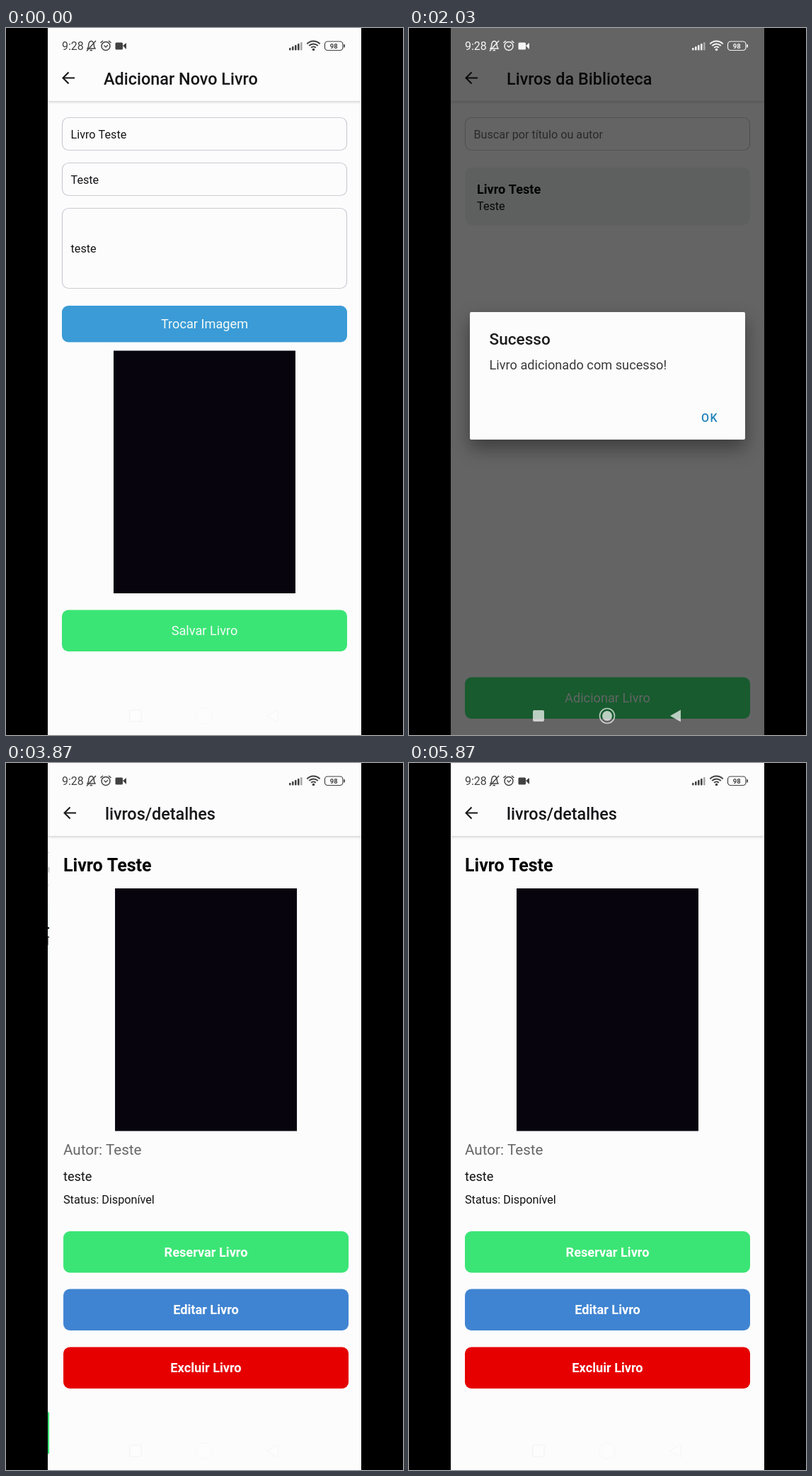
Animation, 561 px wide and 998 px high, one loop 5.9 s. Source, as an HTML page with a canvas:

```html
<!DOCTYPE html>
<html lang="pt">
<head>
<meta charset="utf-8">
<style>
html, body { margin: 0; width: 100%; height: 100%; overflow: hidden; background: #000; }
canvas { display: block; }
</style>
</head>
<body>
<canvas id="stage" width="561" height="998"></canvas>
<script>
const W = 561, H = 998, LOOP = 5900;
const PHONE = { x: 59, w: 443 };
const PAPER = '#fcfcfd', GREEN = '#3be575', BLUE = '#3a9bd6', INK = '#151517';
const stage = document.getElementById('stage').getContext('2d');
const buffers = [];
let c = stage, depth = 0;

const clamp = v => Math.min(1, Math.max(0, v));
const progress = (t, start, length) => clamp((t - start) / length);
const mix = (a, b, p) => a + (b - a) * p;

// Two-part curve used by the system for screen changes
function screenEase(x) {
  const [p0, p1, p2, p3] = x < 1 / 6
    ? [[0, 0], [0.05, 0], [0.1333, 0.06], [0.16667, 0.4]]
    : [[0.16667, 0.4], [0.20833, 0.82], [0.25, 1], [1, 1]];
  const at = (s, k) => (1 - s) ** 3 * p0[k] + 3 * s * (1 - s) ** 2 * p1[k]
    + 3 * s * s * (1 - s) * p2[k] + s ** 3 * p3[k];
  let lo = 0, hi = 1;
  for (let i = 0; i < 24; i++) {
    const mid = (lo + hi) / 2;
    if (at(mid, 0) < x) lo = mid; else hi = mid;
  }
  return at(lo, 1);
}

// Opacity of a touched element: quick fade down, slower return
const touchAlpha = (t, down, up) =>
  mix(mix(1, 0.2, progress(t, down, 150)), 1, progress(t, up, 250));

function layer(alpha, dx, paint) {
  if (alpha <= 0) return;
  const parent = c;
  buffers[depth] = buffers[depth] || new OffscreenCanvas(W, H).getContext('2d');
  c = buffers[depth++];
  c.clearRect(0, 0, W, H);
  paint();
  const image = c.canvas;
  c = parent;
  depth--;
  c.globalAlpha = alpha;
  c.drawImage(image, dx, 0);
  c.globalAlpha = 1;
}

function box(x, y, w, h, r, fill, stroke) {
  c.beginPath();
  c.roundRect(x, y, w, h, r);
  if (fill) { c.fillStyle = fill; c.fill(); }
  if (stroke) { c.strokeStyle = stroke; c.lineWidth = 1.2; c.stroke(); }
}

function text(str, x, y, size, color = INK, weight = 400, align = 'left', spacing = 0) {
  c.font = `${weight} ${size}px Roboto, sans-serif`;
  c.letterSpacing = spacing + 'px';
  c.textAlign = align;
  c.fillStyle = color;
  c.fillText(str, x, y);
}

function line(points, width, color) {
  c.beginPath();
  points.forEach(([x, y]) => c.lineTo(x, y));
  c.strokeStyle = color;
  c.lineWidth = width;
  c.stroke();
}

function button(label, y, h, color, weight = 400) {
  box(79, y, 403, h, 9, color);
  text(label, 280.5, y + h / 2 + 6.5, 18.2, weight > 400 ? '#fff' : '#f4fbf8', weight, 'center');
}

function field(label, y, h, color = INK) {
  box(79.5, y + 0.5, 402, h - 1, 9, null, '#cbcbd2');
  text(label, 91.5, y + h / 2 + 6, 16.2, color);
}

function header(title) {
  c.save();
  c.shadowColor = 'rgba(0,0,0,.22)';
  c.shadowBlur = 4;
  c.shadowOffsetY = 1;
  c.fillStyle = PAPER;
  c.fillRect(PHONE.x, -10, PHONE.w, 113);
  c.restore();
  line([[97, 70.5], [81, 70.5]], 2, INK);
  line([[88.5, 62.5], [80.5, 70.5], [88.5, 78.5]], 2, INK);
  text(title, 138, 80, 23.4, INK, 500);
}

function paper() {
  c.fillStyle = PAPER;
  c.fillRect(PHONE.x, 0, PHONE.w, H);
}

function cover(y) {
  c.fillStyle = '#08040e';
  c.fillRect(152, y, 257, 342.5);
}

function formScreen(saveAlpha) {
  paper();
  header('Adicionar Novo Livro');
  field('Livro Teste', 126, 47);
  field('Teste', 190, 47);
  field('teste', 254, 114);
  button('Trocar Imagem', 392, 51.5, BLUE);
  cover(455.5);
  layer(saveAlpha, 0, () => button('Salvar Livro', 821.5, 58.5, GREEN));
}

function listScreen(itemAlpha) {
  paper();
  header('Livros da Biblioteca');
  field('Buscar por título ou autor', 126, 47, '#666');
  layer(itemAlpha, 0, () => {
    box(79, 197, 403, 81, 9, '#ecf0f2');
    text('Livro Teste', 96, 233.5, 18.1, '#000', 700);
    text('Teste', 96, 256.5, 16.2, '#111');
  });
  button('Adicionar Livro', 916.5, 58.5, GREEN);
}

function detailScreen() {
  paper();
  header('livros/detalhes');
  text('Livro Teste', 79, 152.5, 25, '#000', 700);
  cover(177);
  text('Autor: Teste', 79, 553, 20.6, '#666');
  text('teste', 79, 590, 18.1, '#111');
  text('Status: Disponível', 79, 621.5, 16.2, '#111');
  button('Reservar Livro', 661, 58.5, GREEN, 700);
  button('Editar Livro', 742.5, 58.5, '#3f84d2', 700);
  button('Excluir Livro', 824.5, 58.5, '#e60000', 700);
}

function dialog() {
  c.save();
  c.shadowColor = 'rgba(0,0,0,.4)';
  c.shadowBlur = 26;
  c.shadowOffsetY = 12;
  box(86, 401, 389, 180, 2, PAPER);
  c.restore();
  text('Sucesso', 113.5, 447, 22.6, '#1c1c1c', 500);
  text('Livro adicionado com sucesso!', 113.5, 481.5, 18.2, '#3a3a3a');
  text('OK', 413, 555.5, 16, '#2383b8', 500, 'left', 1.4);
}

function circle(x, y, r, width, color, from = 0, to = Math.PI * 2) {
  c.beginPath();
  c.arc(x, y, r, from, to);
  c.strokeStyle = color;
  c.lineWidth = width;
  c.stroke();
}

function statusBar(white) {
  const shade = Math.round(mix(66, 245, white));
  const ink = `rgb(${shade},${shade},${shade})`;
  text('9:28', 79, 31, 16, ink, 400);

  // Muted bell
  c.beginPath();
  c.moveTo(115, 29);
  c.lineTo(116.5, 26.5);
  c.bezierCurveTo(116.5, 16, 124.5, 16, 124.5, 26);
  c.lineTo(126, 29);
  c.closePath();
  c.strokeStyle = ink;
  c.lineWidth = 1.4;
  c.stroke();
  line([[118.5, 31.5], [122, 31.5]], 1.6, ink);
  line([[114, 32.5], [127, 18]], 1.4, ink);

  // Alarm
  circle(141, 25.5, 6, 1.5, ink);
  line([[138.5, 24.5], [141, 27], [144, 24]], 1.3, ink);
  line([[133.5, 21], [137, 18]], 1.6, ink);
  line([[145, 18], [148.5, 21]], 1.6, ink);

  // Camera
  box(154.5, 20.5, 10.5, 10, 1.5, ink);
  c.beginPath();
  c.moveTo(165, 25);
  c.lineTo(170, 21);
  c.lineTo(170, 30);
  c.closePath();
  c.fill();

  // Signal
  for (let i = 0; i < 5; i++) {
    c.globalAlpha = i === 4 ? 0.45 : 1;
    box(400 + i * 4, 28 - i * 2, 2.6, 3.5 + i * 2, 1, ink);
  }
  c.globalAlpha = 1;

  // Wi-Fi
  for (const r of [4.5, 8.5, 12.5]) circle(434.5, 31, r, 2, ink, -Math.PI * 0.76, -Math.PI * 0.24);
  c.beginPath();
  c.arc(434.5, 30.5, 1.8, 0, 7);
  c.fill();

  // Battery
  box(450.5, 19, 25.5, 12.5, 4, null, ink);
  box(477.3, 23, 1.7, 4.5, 1, ink);
  text('98', 463.3, 28.8, 9.5, ink, 700, 'center');
}

function navBar(strength) {
  const shapes = (fill, edge) => {
    box(175, 963, 16, 16, 2, fill, edge);
    circle(280, 971, 10.5, 1.6, fill);
    if (edge) circle(280, 971, 11.4, 0.7, edge);
    c.beginPath();
    c.arc(280, 971, 7, 0, 7);
    c.fillStyle = fill;
    c.fill();
    c.beginPath();
    c.moveTo(369, 971);
    c.lineTo(384, 962.5);
    c.lineTo(384, 979.5);
    c.closePath();
    c.fill();
    if (edge) { c.strokeStyle = edge; c.lineWidth = 0.8; c.stroke(); }
  };
  shapes(`rgba(255,255,255,${strength})`, 'rgba(120,120,130,.07)');
}

function draw(t) {
  c = stage;
  c.fillStyle = '#000';
  c.fillRect(0, 0, W, H);
  c.save();
  c.beginPath();
  c.rect(PHONE.x, 0, PHONE.w, H);
  c.clip();
  paper();

  const BACK = 1540, FORWARD = 3640, SHIFT = PHONE.w / 10;
  const back = screenEase(progress(t, BACK, 450));
  const forward = screenEase(progress(t, FORWARD, 450));

  if (t < BACK) {
    formScreen(touchAlpha(t, 570, 720));
  } else if (t < FORWARD + 450) {
    layer(1, -SHIFT * (1 - back) - SHIFT * forward, () => listScreen(touchAlpha(t, 3400, 3600)));
    layer(1 - progress(t, BACK + 35, 83), SHIFT * back, () => header('Adicionar Novo Livro'));
    layer(progress(t, FORWARD + 50, 83), SHIFT * (1 - forward), detailScreen);
  } else {
    detailScreen();
  }

  const OPEN = 1524, CLOSE = 2603;
  const dim = 0.6 * (progress(t, OPEN, 200) - progress(t, CLOSE, 200));
  const shown = (1 - (1 - progress(t, OPEN, 220)) ** 3) * (1 - progress(t, CLOSE, 220)) ** 2;
  c.fillStyle = `rgba(0,0,0,${dim})`;
  c.fillRect(PHONE.x, 0, PHONE.w, H);
  layer(shown, 0, dialog);

  const white = progress(t, 1640, 120) - progress(t, 2710, 120);
  statusBar(white);
  navBar(mix(0.38, 0.7, clamp(dim / 0.14)));
  c.restore();
}

function tick() {
  draw(performance.now() % LOOP);
  requestAnimationFrame(tick);
}
tick();
</script>
</body>
</html>
```
